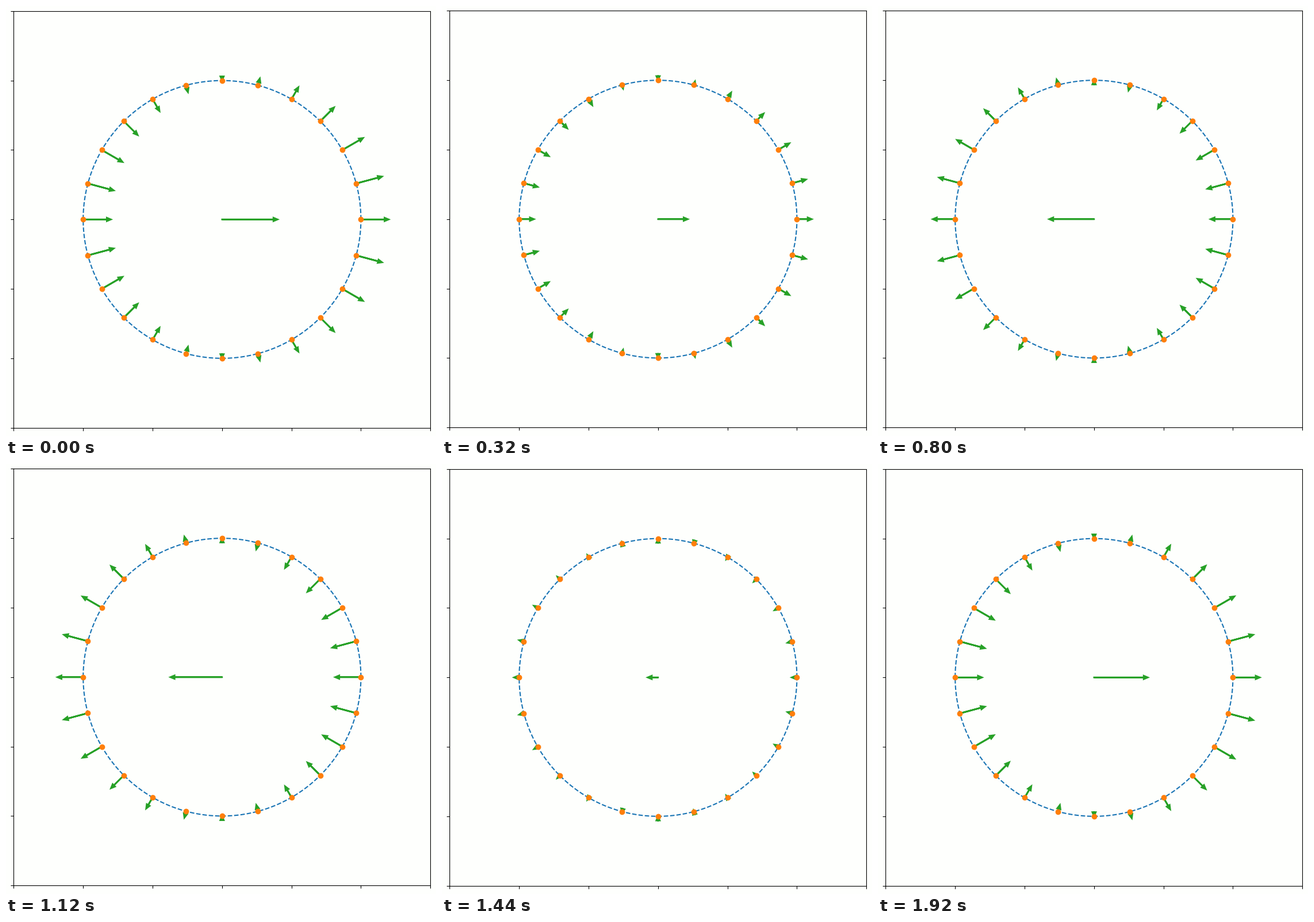
Write a matplotlib script that moves like this. It is 748 px wide and 748 px high and loops after 2 s.

```python
import numpy as np
import matplotlib.pyplot as plt
from matplotlib.animation import FuncAnimation

SIZE, DPI = 748, 100
FRAMES, INTERVAL = 25, 80
LEFT, TOP, SIDE = 13.45, 8.9, 724.75   # axes box in pixels
RADIUS, REACH = 2, 0.8

BACK, BLUE, ORANGE, GREEN = "#fefffd", "#1874b4", "#ff7f0a", "#27a127"

fig = plt.figure(figsize=(SIZE / DPI, SIZE / DPI), dpi=DPI, facecolor=BACK)
ax = fig.add_axes([0, 0, 1, 1], facecolor=BACK)
ax.set(xlim=(-3, 3), ylim=(-3, 3), xticks=range(-3, 4), yticks=range(-3, 4))
ax.tick_params(labelbottom=False, labelleft=False)

# The tiny offset gives the zero-length arrows a downward direction.
theta = np.arange(24) * np.pi / 12 + 1e-9
ux, uy = np.cos(theta), np.sin(theta)
turn = np.linspace(0, 2 * np.pi, 400)

ax.plot(RADIUS * np.cos(turn), RADIUS * np.sin(turn), "--", color=BLUE)
ax.plot(RADIUS * ux, RADIUS * uy, "o", color=ORANGE)


def make_arrow(x, y):
    return ax.arrow(x, y, REACH, 0, head_width=0.05, head_length=0.06,
                    length_includes_head=True, linewidth=2, color=GREEN)


center = make_arrow(0, 0)
ring = [make_arrow(RADIUS * x, RADIUS * y) for x, y in zip(ux, uy)]


def place_axes(top):
    ax.set_position([LEFT / SIZE, 1 - (top + SIDE) / SIZE,
                     SIDE / SIZE, SIDE / SIZE])


def update(i):
    # The plot box jitters by half a pixel in a cycle of three.
    place_axes(TOP if i % 3 == 0 else TOP - 0.5)
    push = REACH * np.cos(2 * np.pi * i / FRAMES)
    center.set_data(dx=push, dy=0)
    for arrow, x, y in zip(ring, ux, uy):
        radial = push / 2 * x
        arrow.set_data(dx=radial * x, dy=radial * y)
    return [center, *ring]


anim = FuncAnimation(fig, update, frames=FRAMES, interval=INTERVAL,
                     repeat=True, repeat_delay=0, blit=False)
plt.show()
```
